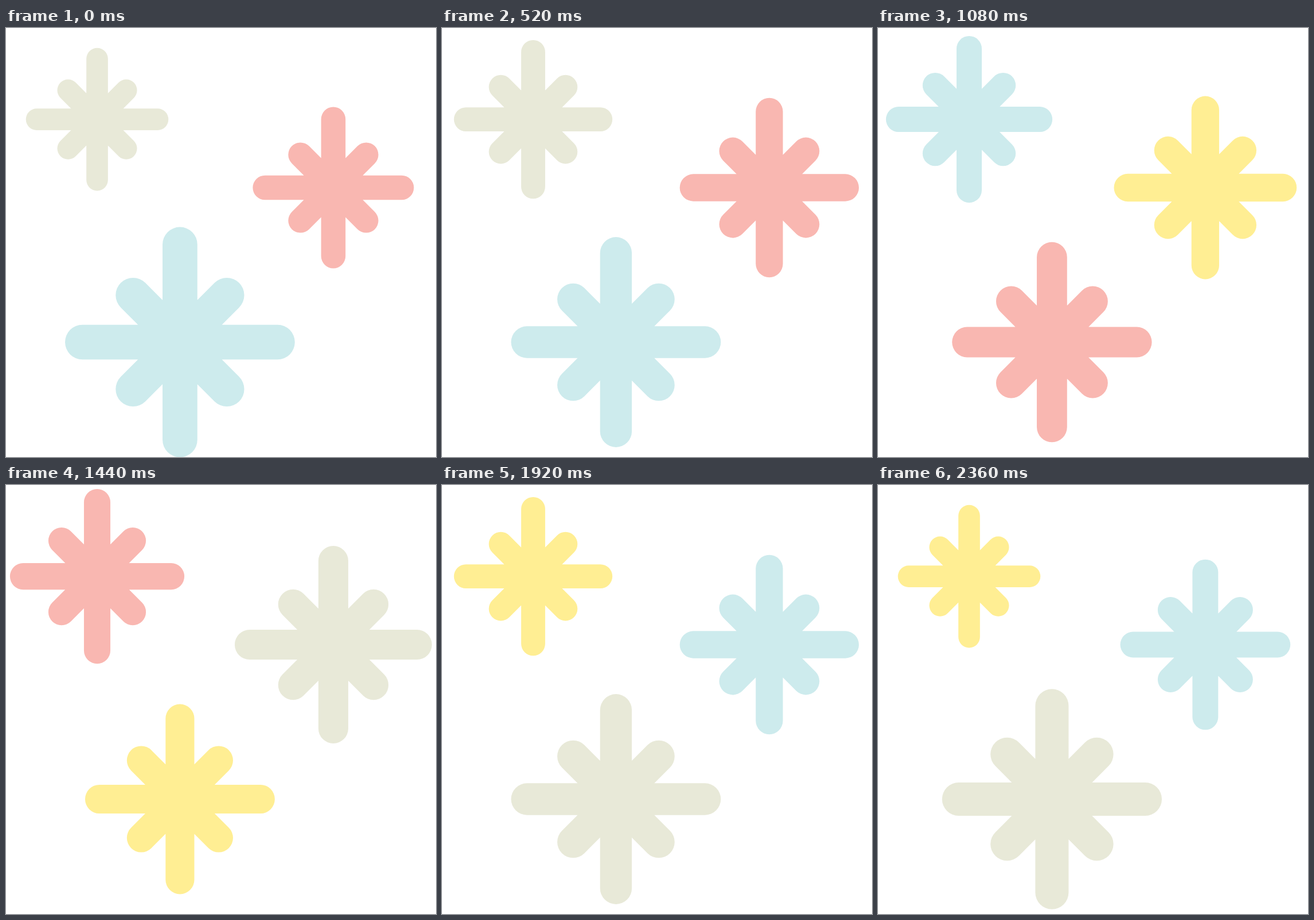
An HTML page for the animation above (2.4 s loop, 750 by 747 pixels).

```html
<!DOCTYPE html>
<html lang="en">
<head>
<meta charset="utf-8">
<title>Pulsing stars</title>
<style>
  html, body { margin: 0; width: 100%; height: 100%; overflow: hidden; background: #fff; }
  svg { display: block; width: 100%; height: 100%; }
  path { fill: none; stroke-linecap: round; stroke-width: 0.303; }
</style>
</head>
<body>
<svg id="stage" viewBox="0 0 750 747"></svg>
<script>
const SVG = 'http://www.w3.org/2000/svg';
const TICK = 40, BEAT = 15, TURN = 9, LOOP = 60;

const beige = '#e8e9d8', pink = '#f9b7b1', blue = '#cdebed', yellow = '#ffee93';

// rest / turn: arm length at the start and at the turning point of a beat
// early: the beat whose return finishes one tick sooner
const stars = [
  { x: 159, y: 159.1, rest: 124.3, turn: 166, early: 3, colors: [beige, blue, pink, yellow] },
  { x: 570.9, y: 278, rest: 140.5, turn: 187.7, early: 1, colors: [pink, yellow, beige, blue] },
  { x: 303.4, y: 547, rest: 200.4, turn: 148, early: -1, colors: [blue, pink, yellow, beige] }
];

// Unit star: long upright cross and short diagonal cross
const long = 1 - 0.1515, diag = 0.408;
const shape = `M0 ${-long}V${long}M${-long} 0H${long}` +
  `M${-diag} ${-diag}L${diag} ${diag}M${diag} ${-diag}L${-diag} ${diag}`;

for (const star of stars) {
  star.el = document.createElementNS(SVG, 'path');
  star.el.setAttribute('d', shape);
  document.getElementById('stage').append(star.el);
}

function armLength(star, beat, step) {
  const end = beat === star.early ? BEAT - 1 : BEAT;
  const k = step < TURN ? step / TURN : Math.max(0, (end - step) / (end - TURN));
  return star.rest + (star.turn - star.rest) * k;
}

function draw(ms) {
  const tick = Math.floor(ms / TICK) % LOOP;
  const beat = Math.floor(tick / BEAT), step = tick % BEAT;
  for (const star of stars) {
    const size = armLength(star, beat, step);
    star.el.setAttribute('transform', `translate(${star.x} ${star.y}) scale(${size})`);
    star.el.setAttribute('stroke', star.colors[beat]);
  }
}

const start = performance.now();
function loop() {
  draw(performance.now() - start);
  requestAnimationFrame(loop);
}
loop();
</script>
</body>
</html>
```
